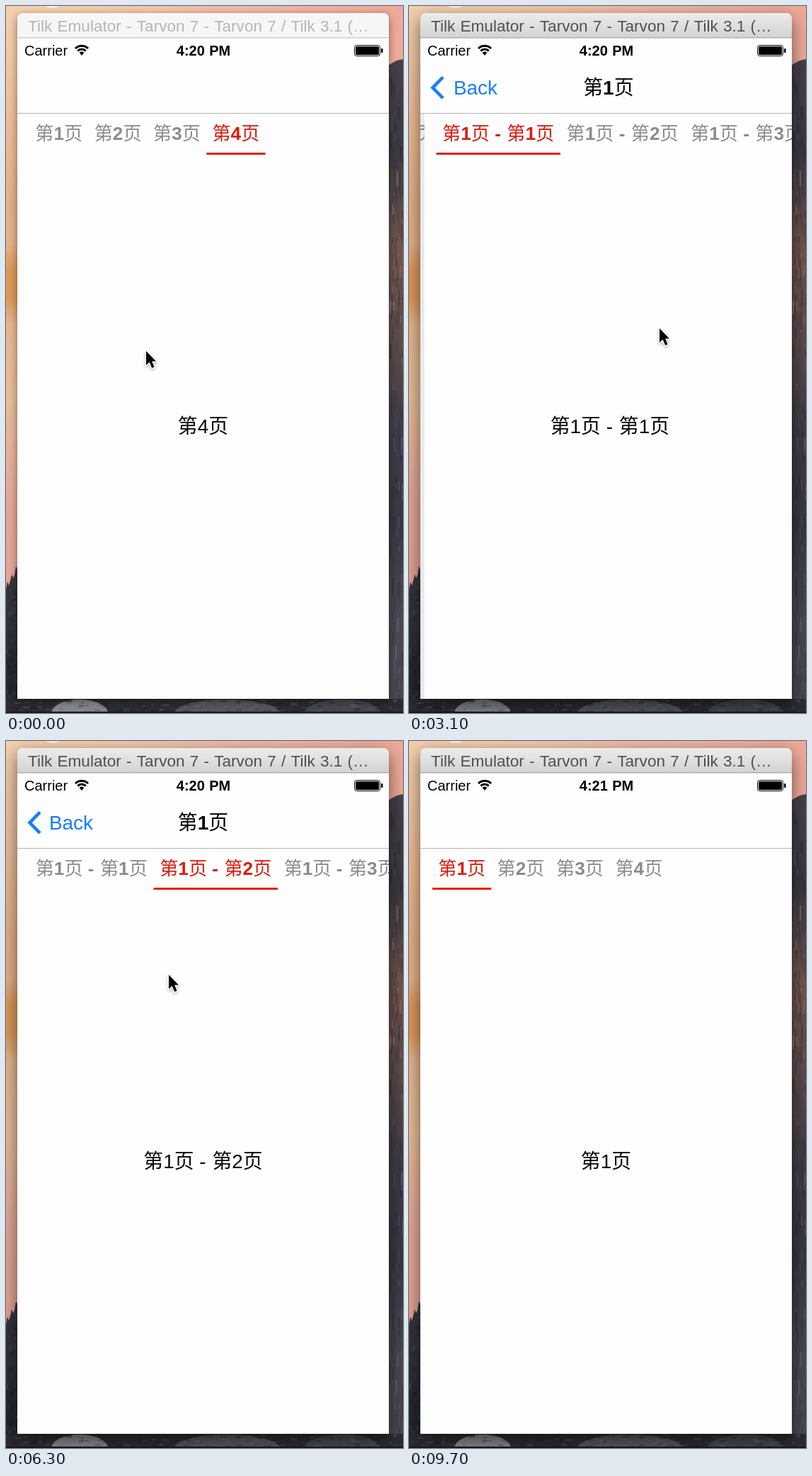
These frames come from a looping animation (561 by 998 pixels, 10 s). An HTML page with a canvas:

```html
<!DOCTYPE html>
<html lang="zh">
<head>
<meta charset="utf-8">
<title>Pager</title>
<style>
html, body { margin: 0; width: 100%; height: 100%; overflow: hidden; background: #2b2c33; }
canvas { display: block; width: 561px; height: 998px; }
</style>
</head>
<body>
<canvas id="stage" width="561" height="998"></canvas>
<script>
const W = 561, H = 998, LOOP = 10000, STEP = 100;
const WIN = { x: 16, y: 10, w: 525, h: 968 };
const MID = 278.5, TABS = 4, NAV = 27.9;
const RED = '#dc1c10', GRAY = '#8c8c8c', BLUE = '#157efb', PAPER = '#fefefe';
const LATIN = '"Liberation Sans", Arial, sans-serif';
const HAN = '"Noto Sans CJK SC", "Noto Sans CJK", sans-serif';
const CELL = [83.4, 175.5, 267.5];
const SWIPE = 300, GLIDE = 200;
const stage = document.getElementById('stage');
const g = stage.getContext('2d');

// Page changes: dir is the change of page number, taps leave the pointer still.
const rootMoves = [150, 540, 930].map(at => ({ at, dir: -1 }));
const childMoves = [
  { at: 3750, dir: 1 }, { at: 4150, dir: 1 },
  { at: 4800, dir: -1, tap: true }, { at: 5150, dir: 1, tap: true },
  { at: 5900, dir: -1 }, { at: 6300, dir: -1 }
];
// Resting places of the pointer: start of the glide, x, y
const stops = [
  [0, 198, 487], [1250, 432, 516], [1800, 367, 516], [2000, 300, 512], [2300, 354, 455],
  [4550, 290, 195], [4900, 437, 201], [5600, 230, 330], [6800, 172, 328], [7900, 99, 116]
];

const mix = (a, b, k) => a + (b - a) * k;
const part = (t, start, length) => Math.min(1, Math.max(0, (t - start) / length));
const ease = k => k * k * (3 - 2 * k);

function pagePos(moves, first, t) {
  return moves.reduce((pos, m) => pos + m.dir * ease(part(t, m.at, SWIPE)), first);
}

function rootPos(t) {
  return pagePos(rootMoves, TABS - 1, t) + .36 * Math.sin(Math.PI * part(t, 1700, 500));
}

function pointer(t) {
  let [, x, y] = stops[0];
  for (const [at, sx, sy] of stops.slice(1)) {
    const k = ease(part(t, at, GLIDE));
    x = mix(x, sx, k);
    y = mix(y, sy, k);
  }
  for (const m of [...rootMoves, ...childMoves])
    if (!m.tap) x -= m.dir * 160 * Math.sin(Math.PI * part(t, m.at, SWIPE));
  return [x, y];
}

function spring(ms) {
  const k = Math.max(0, ms) * .026;
  return 1 - (1 + k) * Math.exp(-k);
}

function random(seed) {
  return () => (seed = (seed * 16807) % 2147483647) / 2147483647;
}

function ramp(c, y0, y1, ...colors) {
  const r = c.createLinearGradient(0, y0, 0, y1);
  colors.forEach((color, i) => r.addColorStop(i / (colors.length - 1), color));
  return r;
}

function poly(c, points, fill) {
  c.beginPath();
  points.forEach(([x, y]) => c.lineTo(x, y));
  c.closePath();
  c.fillStyle = fill;
  c.fill();
}

function paintWallpaper() {
  const pic = document.createElement('canvas');
  pic.width = W;
  pic.height = H;
  const c = pic.getContext('2d'), rnd = random(71);

  const streaks = (n, x, y, w, h, sw, sh, dark, light) => {
    for (let i = 0; i < n; i++) {
      c.globalAlpha = .1 + rnd() * .25;
      c.fillStyle = rnd() < .6 ? dark : light;
      c.fillRect(x + rnd() * w, y + rnd() * h, sw * (.4 + rnd()), sh * (.4 + rnd()));
    }
    c.globalAlpha = 1;
  };

  // Sky with an orange band
  c.fillStyle = ramp(c, 0, 830, '#f5d0ae', '#eebf9a', '#e6b088', '#e6b48c', '#e8bd98', '#e3a897', '#e5a295');
  c.fillRect(0, 0, W, H);
  c.fillStyle = ramp(c, 335, 450, '#dd985a00', '#dd985a', '#dd985a', '#dd985a00');
  c.fillRect(0, 335, 20, 115);
  const top = c.createLinearGradient(0, 0, W, 0);
  top.addColorStop(0, '#f5d0ae00');
  top.addColorStop(.5, '#f2bfa8');
  top.addColorStop(1, '#eea998');
  c.fillStyle = top;
  c.fillRect(0, 0, W, 100);
  c.fillStyle = '#fdece0';
  c.beginPath();
  c.ellipse(66, 0, 9, 3, 0, 0, 7);
  c.fill();

  // Right cliff
  poly(c, [[536, 86], [552, 77], [561, 75], [561, H], [536, H]],
    ramp(c, 75, H, '#46404a', '#3b3841', '#70564f', '#5c4a4a', '#3d3b46', '#383843', '#484851', '#474851'));
  streaks(130, 541, 84, 20, 890, 2, 20, '#22222c', '#77747c');
  streaks(40, 541, 220, 20, 200, 2, 24, '#33292c', '#d0a07a');

  // Left pines
  const ridge = [[0, H]];
  for (let x = 0; x <= 20; x += 2) ridge.push([x, 812 - x * 1.8 + rnd() * 14]);
  poly(c, [...ridge, [20, H]], ramp(c, 780, H, '#3c3740', '#2c2e39', '#20222b'));
  streaks(60, 0, 820, 16, 165, 4, 7, '#171a22', '#555762');

  // Ground with pale rocks
  c.fillStyle = '#2b2c33';
  c.fillRect(0, 978, W, 20);
  for (const [x, r, color] of [[104, 40, '#85868b'], [312, 74, '#55565d'], [476, 54, '#45474f']]) {
    c.fillStyle = color;
    c.beginPath();
    c.ellipse(x, H, r, 19, 0, Math.PI, 0);
    c.fill();
  }
  streaks(160, 0, 978, W, 18, 8, 3, '#1a1b21', '#777980');
  c.fillStyle = '#1d1420';
  c.fillRect(0, 996, W, 2);
  return pic;
}

// Han and Latin runs use different families and weights.
function runs(str, size, bold) {
  return str.match(/[\u4e00-\u9fff]+|[^\u4e00-\u9fff]+/g).map(s => {
    const han = s > '\u4e00';
    const font = han ? `${bold ? 500 : 400} ${size}px ${HAN}` : `${bold ? 700 : 400} ${size}px ${LATIN}`;
    g.font = font;
    return { s, font, w: g.measureText(s).width };
  });
}

function text(str, x, y, size, color, { bold = false, center = false, alpha = 1 } = {}) {
  if (alpha < .01) return;
  g.save();
  g.wordSpacing = `${size * .04}px`;
  g.globalAlpha = alpha;
  g.fillStyle = color;
  const parts = runs(str, size, bold);
  if (center) x -= parts.reduce((n, p) => n + p.w, 0) / 2;
  for (const p of parts) {
    g.font = p.font;
    g.fillText(p.s, x, y);
    x += p.w;
  }
  g.restore();
}

const pageName = (level, i) => '第1页 - '.repeat(level) + `第${i + 1}页`;

// The bar runs ahead of the page it belongs to.
function barPos(pos) {
  const whole = Math.floor(pos);
  return whole + 1 - Math.pow(1 - (pos - whole), 2.33);
}

function page(level, x, pos, cover) {
  if (x >= WIN.w) return;
  const cell = CELL[level], bar = barPos(pos), chosen = Math.round(bar);
  const shift = Math.max(0, 17 + cell * (bar + 1) - 508);
  g.save();
  g.translate(x, 0);
  g.beginPath();
  g.rect(WIN.x, 152, WIN.w, 826);
  g.clip();
  g.fillStyle = PAPER;
  g.fillRect(WIN.x, 152, WIN.w, 826);
  for (let i = 0; i < TABS; i++) {
    const name = pageName(level, i);
    text(name, 33 + cell * (i + .5) - shift, 189, 26.2, i === chosen ? RED : GRAY, { bold: true, center: true });
    text(name, MID + (i - pos) * WIN.w, 603, NAV, '#0a0a0a', { center: true });
  }
  g.fillStyle = '#e2260f';
  g.fillRect(33 + cell * bar - shift, 207, cell, 3);
  g.fillStyle = `rgba(0,0,0,${.085 * Math.pow(cover, 3)})`;
  g.fillRect(WIN.x, 152, WIN.w, 826);
  g.restore();
}

function navBar(c1, c2) {
  const fadeIn = Math.pow(1 - c2, 5), fadeOut = c => Math.pow(c, 1.4), travel = 328;
  const title = (str, x, alpha) => text(str, x, 125, NAV, '#000', { bold: true, center: true, alpha });
  const back = (str, x, alpha) => text(str, x, 125, NAV, BLUE, { alpha });
  g.fillStyle = PAPER;
  g.fillRect(WIN.x, 46, WIN.w, 105);
  g.fillStyle = '#b4b4b4';
  g.fillRect(WIN.x, 151, WIN.w, 1);
  if (c1 < .005) return;
  back('Back', mix(248, 61, c1) - 120 * c2, fadeOut(c1) * fadeIn);
  back('第…', mix(244, 60, c2), c2 * c2);
  title('第1页', mix(MID + travel * (1 - c1), 72, c2), fadeOut(c1) * fadeIn * (1 - .3 * part(c2, 0, .2)));
  title('第1页 - 第1页', MID + travel * (1 - c2), fadeOut(c2));
  g.globalAlpha = c1;
  g.strokeStyle = BLUE;
  g.lineWidth = 4.6;
  g.lineJoin = 'miter';
  g.beginPath();
  g.moveTo(48, 100.5);
  g.lineTo(33.5, 115.3);
  g.lineTo(48, 130);
  g.stroke();
  g.globalAlpha = 1;
}

function statusBar(t) {
  text('Carrier', 26, 70, 20, '#000');
  text(t < 6900 ? '4:20 PM' : '4:21 PM', 279, 70, 20, '#000', { bold: true, center: true });
  g.strokeStyle = g.fillStyle = '#000';
  const wave = r => {
    g.beginPath();
    g.arc(107, 69, r, -Math.PI * .75, -Math.PI * .25);
  };
  g.lineWidth = 3;
  for (const r of [8, 12.7]) {
    wave(r);
    g.stroke();
  }
  wave(4.6);
  g.lineTo(107, 70);
  g.fill();
  g.lineWidth = 1;
  g.beginPath();
  g.roundRect(492.5, 55.5, 36, 15, 3);
  g.stroke();
  g.beginPath();
  g.roundRect(494, 57, 33, 12, 1.5);
  g.roundRect(530, 60, 2.5, 6, 1);
  g.fill();
}

function windowPath() {
  g.beginPath();
  g.roundRect(WIN.x, WIN.y, WIN.w, WIN.h, [8, 8, 0, 0]);
}

function titleBar(active) {
  g.fillStyle = active ? ramp(g, 10, 45, '#ececec', '#d2d2d2') : '#f6f6f6';
  g.fillRect(WIN.x, WIN.y, WIN.w, 35);
  g.fillStyle = active ? '#b0b0b0' : '#cfcfcf';
  g.fillRect(WIN.x, 44, WIN.w, 1.5);
  text('Tilk Emulator - Tarvon 7 - Tarvon 7 / Tilk 3.1 (…', 31, 36, 22.6, active ? '#505050' : '#b6b6b6');
}

function cursor(x, y) {
  g.save();
  g.translate(x, y);
  g.beginPath();
  [[0, 0], [0, 20], [4.6, 15.8], [8.2, 24], [11.6, 22.5], [8.2, 14.6], [14, 14.4]]
    .forEach(([px, py]) => g.lineTo(px, py));
  g.closePath();
  g.shadowColor = 'rgba(0,0,0,.3)';
  g.shadowBlur = 4;
  g.shadowOffsetY = 2;
  g.strokeStyle = '#fff';
  g.lineWidth = 2.6;
  g.lineJoin = 'round';
  g.stroke();
  g.shadowColor = 'transparent';
  g.fillStyle = '#000';
  g.fill();
  g.restore();
}

const wallpaper = paintWallpaper();

function draw(t) {
  const active = t >= 100;
  const c1 = spring(t - 2846) - spring(t - 9260);
  const c2 = spring(t - 7107) - spring(t - 8394);
  const slide = WIN.w * .3;
  g.drawImage(wallpaper, 0, 0);

  g.save();
  g.shadowColor = `rgba(0,0,0,${active ? .55 : .45})`;
  g.shadowBlur = active ? 24 : 12;
  g.shadowOffsetY = active ? 8 : 3;
  windowPath();
  g.fillStyle = PAPER;
  g.fill();
  g.restore();

  g.save();
  windowPath();
  g.clip();
  page(0, -slide * c1, rootPos(t), c1);
  page(1, WIN.w * (1 - c1) - slide * c2, pagePos(childMoves, 0, t), c2);
  page(2, WIN.w * (1 - c2), 0, 0);
  navBar(c1, c2);
  statusBar(t);
  titleBar(active);
  g.restore();

  if (t < 9700) cursor(...pointer(t));
}

// The screen advances ten times a second.
const start = performance.now();
function tick() {
  const t = (performance.now() - start) % LOOP;
  draw(Math.floor(t / STEP) * STEP);
  requestAnimationFrame(tick);
}
tick();
</script>
</body>
</html>
```
